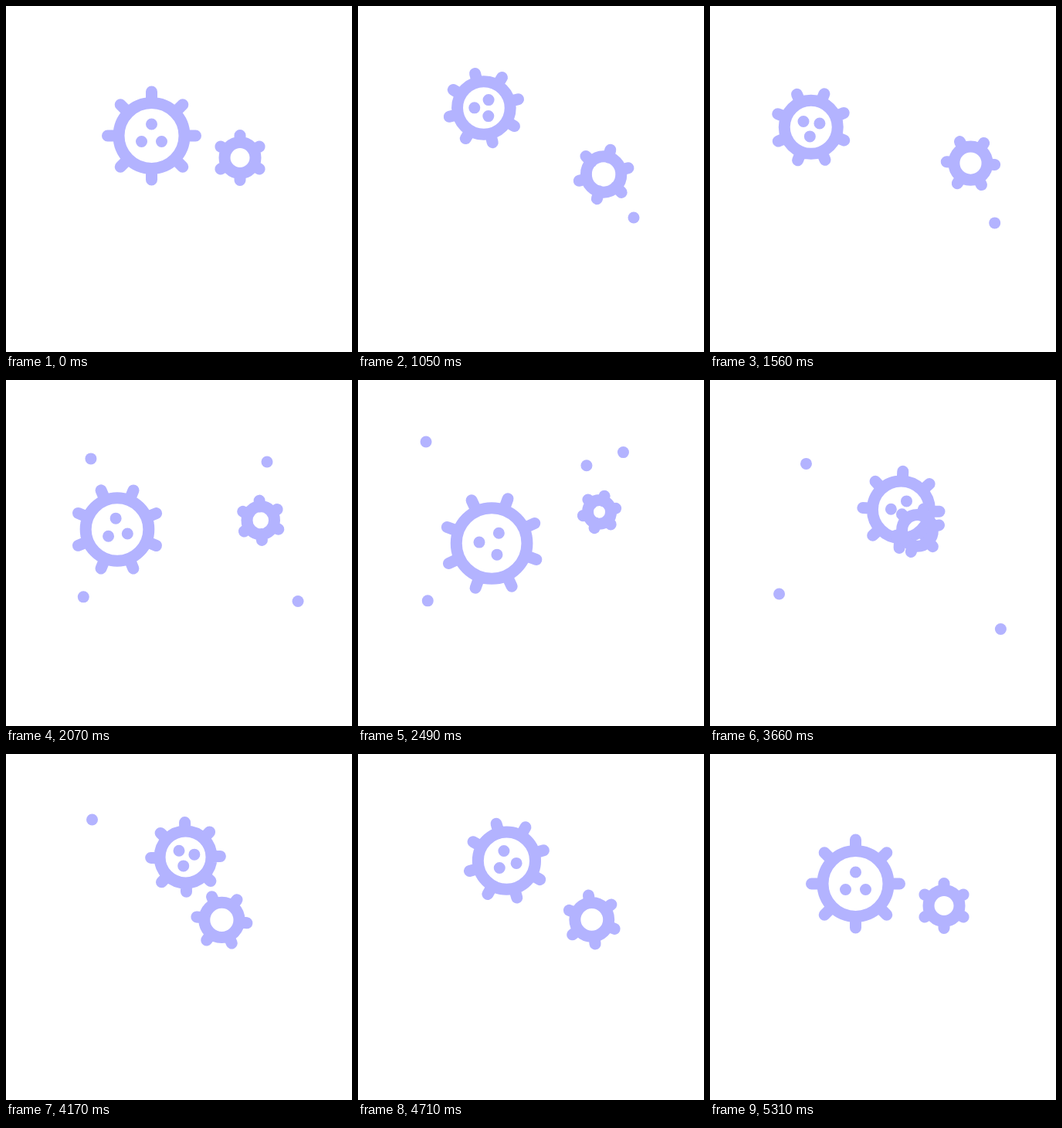
Recreate the animation shown at these times as an HTML page. Size 448 by 448 pixels, loop 5400 ms.

```html
<!DOCTYPE html>
<html lang="en">
<head>
<meta charset="utf-8">
<title>Drifting microbes</title>
<style>
  html, body { margin: 0; width: 100%; height: 100%; overflow: hidden; background: #fff; }
  svg { display: block; width: 100vw; height: 100vh; }
  path { fill: none; stroke: #b3b3ff; stroke-width: 15; stroke-linecap: round; }
</style>
</head>
<body>
<svg id="stage" viewBox="0 0 448 448"></svg>
<script>
const LOOP = 5400, STEP = 30, RAMP = 700, LIFE = 1150;
const stage = document.getElementById('stage');

function newPath(d = '') {
  const p = document.createElementNS('http://www.w3.org/2000/svg', 'path');
  p.setAttribute('d', d);
  return p;
}

// Heart-shaped drift routes, relative to the resting places
const bigRoute = newPath('M0 0C2-34-8-40-25.5-36C-47-31-78-5-46 24' +
  'C-29 41 2 58 33.5 35.5C60 17 74-26 42-35.2C16-43-2-44 0 0');
const smallRoute = newPath('M0 0C-1 20.4 5 24 15 21.5C28 18 47 4 27-14.5' +
  'C17-23.5-1-35-21-22C-37-11-42 13-20.5 19.5C-8 23 4 30 0 0');

// Particles: launch time, from, to
const dots = [
  { start: 1050, from: [357, 274], to: [379.5, 287.3] },
  { start: 1815, from: [334.3, 114.4], to: [348, 83.3] },
  { start: 1815, from: [107, 277.5], to: [82, 290] },
  { start: 1850, from: [122.5, 114.5], to: [68.5, 60.5] },
  { start: 2470, from: [296, 112], to: [294, 53.5] },
  { start: 2730, from: [355, 309], to: [379.5, 324.5] },
  { start: 3000, from: [133.5, 257], to: [66.5, 287.5] },
  { start: 3120, from: [142, 140], to: [110, 82.3] }
];

// Steady speed with a soft start and stop
function travel(t) {
  if (t > LOOP / 2) return 1 - travel(LOOP - t);
  return (t < RAMP ? t * t / (2 * RAMP) : t - RAMP / 2) / (LOOP - RAMP);
}

function along(route, t) {
  return route.getPointAtLength(route.getTotalLength() * travel(t));
}

const fix = n => n.toFixed(2);
const spot = (x, y) => `M${fix(x)} ${fix(y)}h.01`;

// Ring with evenly spaced teeth; line weight stays constant at any scale
function microbe(x, y, r, reach, teeth, turn, core) {
  const at = (d, deg) => {
    const a = (deg + turn - 90) * Math.PI / 180;
    return [x + d * Math.cos(a), y + d * Math.sin(a)];
  };
  const R = fix(r);
  let d = `M${fix(x - r)} ${fix(y)}a${R} ${R} 0 1 1 ${fix(2 * r)} 0a${R} ${R} 0 1 1 ${fix(-2 * r)} 0z`;
  for (let i = 0; i < teeth; i++) {
    const deg = i * 360 / teeth;
    d += `M${at(r, deg).map(fix)}L${at(reach, deg).map(fix)}`;
  }
  if (core) for (let i = 0; i < 3; i++) d += spot(...at(core, i * 120));
  return d;
}

function particle({ start, from, to }, t) {
  const u = (t - start) / LIFE;
  if (u < 0 || u >= 1) return '';
  const left = (1 - u) ** 1.25;
  return spot(...to.map((end, i) => end + (from[i] - end) * left));
}

const addPath = () => stage.appendChild(newPath());
const big = addPath(), small = addPath(), specks = dots.map(addPath);

function draw(time) {
  let t = Math.floor(time % LOOP / STEP) * STEP;
  if (t < 180 || t >= 5310) t = 0;
  const lag = Math.max(0, t - STEP);
  const wave = n => Math.cos(n * Math.PI * lag / LOOP);
  const turn = 180 * (1 - wave(1));
  const S = .92 - .05 * wave(2) + .13 * wave(4);
  const s = .99 + .138 * wave(2) - .128 * wave(4);
  const a = along(bigRoute, lag), b = along(smallRoute, lag);
  big.setAttribute('d', microbe(188.5 + a.x, 168 + a.y, 42.5 * S, 57 * S, 8, turn, 15 * S));
  small.setAttribute('d', microbe(303 + b.x, 196.5 + b.y, 20 * s, 29 * s, 6, turn / 2));
  dots.forEach((dot, i) => specks[i].setAttribute('d', particle(dot, t)));
}

let start;
function tick(now) {
  if (start === undefined) start = now;
  draw(now - start);
  requestAnimationFrame(tick);
}
draw(0);
requestAnimationFrame(tick);
</script>
</body>
</html>
```
